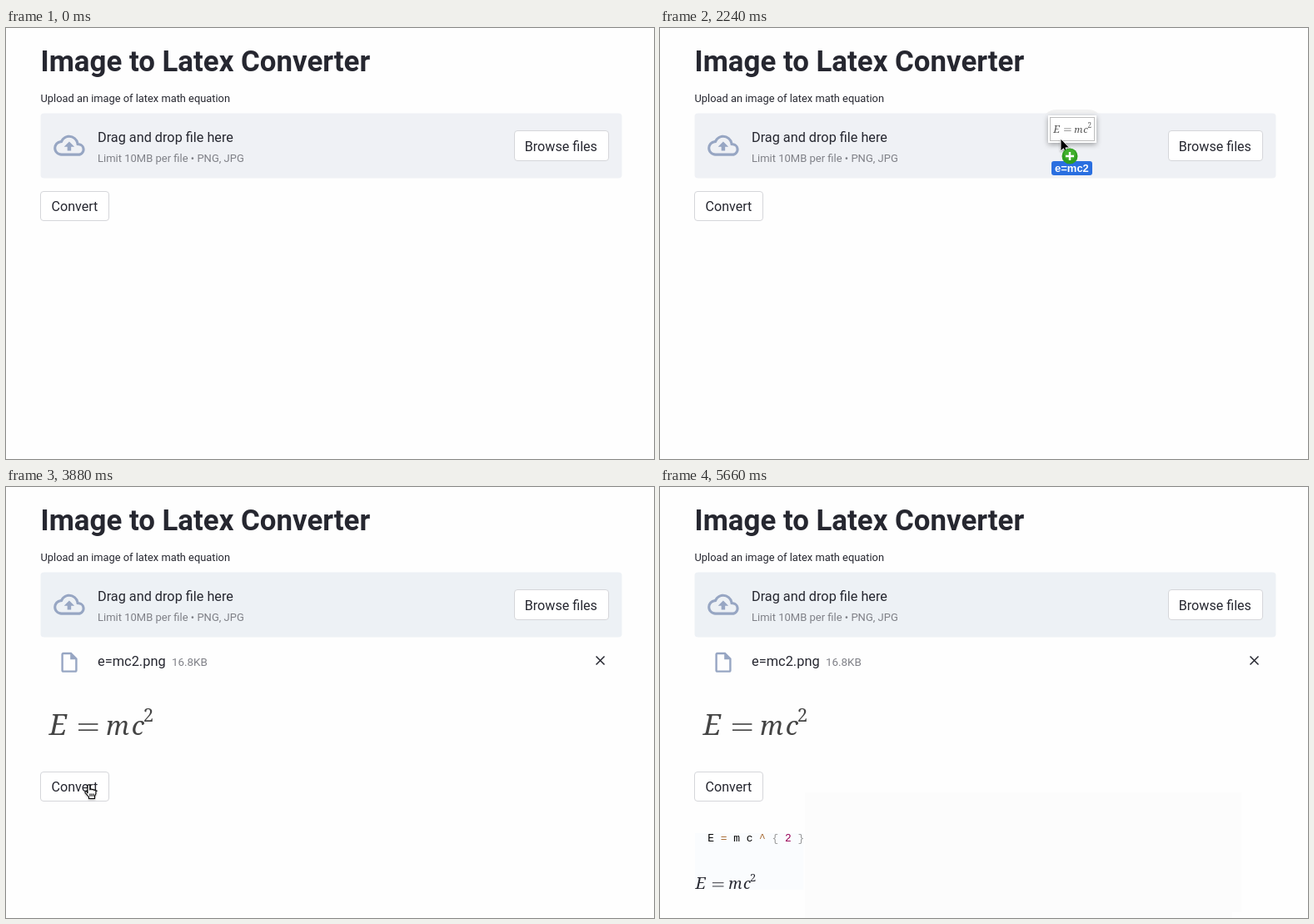
Write an HTML page that moves like this. It is 778 px wide and 518 px high and loops after 5760 ms.

```html
<!DOCTYPE html>
<html lang="en">
<head>
<meta charset="utf-8">
<title>Image to Latex Converter</title>
<style>
  html, body { margin: 0; width: 100%; height: 100%; overflow: hidden; background: #fefefe; }
  svg { display: block; }
  text { font-family: Roboto, sans-serif; fill: #262730; }
  .muted { fill: #7f8087; }
  .mono { font: 12.9px "Liberation Mono", monospace; fill: #000; }
  .math text { font-family: "Noto Serif", serif; fill: inherit; }
  .math .it { font-style: italic; }
  .tag { font: bold 13px "Liberation Sans", sans-serif; fill: #fff; }
  .icon { fill: #97a6c3; }
  .btn { fill: #fff; stroke: #d5d6da; }
  .op { fill: #a5652a; }
  .brace { fill: #999; }
  .num { fill: #905; }
  #convert.hot .btn { stroke: #f63366; }
  #convert.hot text { fill: #f63366; }
  #paper { filter: drop-shadow(0 2px 3px rgba(0, 0, 0, .35)); }
  #arrow, #hand { filter: drop-shadow(0 1px 1px rgba(0, 0, 0, .35)); }
</style>
</head>
<body>
<svg width="778" height="518" viewBox="0 0 778 518">
  <clipPath id="aboveZone"><rect width="778" height="102.5"/></clipPath>
  <rect width="778" height="518" fill="#fefefe"/>
  <text x="41.5" y="52.3" font-size="34.85" font-weight="700">Image to Latex Converter</text>
  <text x="41.5" y="88.6" font-size="12.85">Upload an image of latex math equation</text>

  <rect id="zone" x="41.5" y="102.5" width="698" height="78" rx="4"/>
  <path class="icon" transform="translate(57.2 122.5) scale(1.56)" d="M19.35 10.04A7.49 7.49 0 0 0 12 4C9.11 4 6.6 5.64 5.35 8.04A6 6 0 0 0 0 14c0 3.31 2.69 6 6 6h13c2.76 0 5-2.24 5-5 0-2.64-2.05-4.78-4.65-4.96zM19 18H6c-2.21 0-4-1.79-4-4 0-2.05 1.53-3.76 3.56-3.97l1.07-.11.5-.95A5.47 5.47 0 0 1 12 6c2.62 0 4.88 1.86 5.39 4.43l.3 1.5 1.53.11A2.98 2.98 0 0 1 22 15c0 1.65-1.35 3-3 3zM8 13h2.55v3h2.9v-3H16l-4-4z"/>
  <text x="110" y="137.3" font-size="16.25">Drag and drop file here</text>
  <text class="muted" x="110" y="161" font-size="13">Limit 10MB per file • PNG, JPG</text>
  <rect class="btn" x="610.5" y="123.5" width="113" height="36" rx="3.5"/>
  <text x="622.8" y="147.6" font-size="16.1">Browse files</text>

  <g id="file">
    <path class="icon" transform="translate(61.6 196.4) scale(1.2)" d="M14 2H6c-1.1 0-2 .9-2 2v16c0 1.1.9 2 2 2h12c1.1 0 2-.9 2-2V8l-6-6zM6 20V4h7v5h5v11H6z"/>
    <text x="110" y="214.5" font-size="16.4">e=mc2.png</text>
    <text class="muted" x="199" y="214.5" font-size="13.4">16.8KB</text>
    <path d="M708.5 203.5l10 10m0-10l-10 10" stroke="#262730" stroke-width="1.5"/>
  </g>
  <g id="preview" class="math" fill="#444"></g>

  <g id="convert">
    <rect id="ring" x="40" y="-1.5" width="85" height="38" rx="5" fill="none" stroke="#fa99b3" stroke-width="3"/>
    <rect class="btn" x="41.5" width="82" height="35" rx="3.5"/>
    <text x="54.5" y="23.6" font-size="16.1">Convert</text>
  </g>

  <g id="output">
    <rect x="42" y="416" width="130.5" height="68" fill="#fafcfe"/>
    <text class="mono" x="57.2" y="426">E <tspan class="op">=</tspan> m c <tspan class="op">^</tspan> <tspan class="brace">{</tspan> <tspan class="num">2</tspan> <tspan class="brace">}</tspan></text>
    <g id="result" class="math" fill="#262730"></g>
  </g>
  <path id="panel" d="M174 367H698V511H687V518H174Z" fill="#fcfcfc"/>

  <g clip-path="url(#aboveZone)">
    <rect id="halo" x="-8" y="-7" width="74" height="48" rx="18" fill="#000" opacity=".05"/>
  </g>
  <g id="drag">
    <g id="paper">
      <rect width="58" height="33" fill="#fff"/>
      <rect x="2.5" y="2.5" width="53" height="28" fill="#fff" stroke="#bdbdbd"/>
    </g>
    <g id="mini" class="math" fill="#555"></g>
    <rect id="tagBox" x="4" y="55" width="49" height="17" rx="3"/>
    <text class="tag" x="8" y="68">e=mc2</text>
  </g>
  <path id="arrow" d="M0 0V15L3.4 11.8L5.8 17.2L8.2 16.2L5.9 10.9H10.6Z" stroke="#fff" stroke-width=".9"/>
  <g id="badge">
    <circle r="9.5" fill="#2f9e1f"/>
    <circle cy="-2" r="7" fill="#4cbb35" opacity=".6"/>
    <path d="M-5 0H5M0-5V5" stroke="#fff" stroke-width="2.4"/>
  </g>
  <g id="hand" fill="#fff" stroke="#000" stroke-width="1.1" stroke-linejoin="round">
    <path d="M4 11V2.2a1.4 1.4 0 0 1 2.8 0V7a1.3 1.3 0 0 1 2.5 0a1.3 1.3 0 0 1 2.4.6a1.2 1.2 0 0 1 2.2.8V11.5L12.5 14.5V17.5H5.5V15.5L1 10.4a1.3 1.3 0 0 1 2-1.5Z"/>
    <path d="M6.9 11.5v3.2M9 11.5v3.2M11.1 11.5v3.2"/>
  </g>
</svg>
<script>
const LOOP = 5760;
const $ = id => document.getElementById(id);
const show = (id, on) => { $(id).style.display = on ? "" : "none"; };
const move = (id, x, y) => $(id).setAttribute("transform", `translate(${x} ${y})`);
const latest = (steps, t) => steps.filter(s => s[0] <= t).pop();

// Each step: start time, then its values.
const dragSteps = [[0], [1650, 548, 70], [1800, 495, 74], [1950, 468, 97], [2090, 467, 103], [2240, 466, 105], [2390]];
const pointerSteps = [
  [0], [1650, "arrow", 556, 97], [1800, "arrow", 507, 101], [1950, "arrow", 485, 125],
  [2090, "arrow", 483, 131], [2240, "arrow", 481, 133], [3280, "arrow", 409.5, 165],
  [3430, "arrow", 161, 358], [3580, "arrow", 110, 386], [3730, "arrow", 99, 357],
  [3880, "hand", 94, 357], [5060, "arrow", 175, 367], [5210, "arrow", 688, 511], [5360]
];
const buttonSteps = [[0, 196.5], [2390, 249.5], [2830, 342.5]];

function drawMath(id, x, y, em) {
  const glyph = (ch, dx, size, dy = 0, cls = "it") =>
    `<text class="${cls}" x="${x + dx * em}" y="${y - dy * em}" font-size="${size * em}">${ch}</text>`;
  const bar = dy =>
    `<rect x="${x + em}" y="${y - dy * em}" width="${.65 * em}" height="${.045 * em}"/>`;
  $(id).innerHTML = glyph("E", .02, .96) + bar(.37) + bar(.17) +
    glyph("m", 1.92, .87) + glyph("c", 2.77, .87) + glyph("2", 3.16, .62, .42, "");
}

function render(t) {
  const [, dx, dy] = latest(dragSteps, t);
  const [, kind, px, py] = latest(pointerSteps, t);
  const dragging = dx !== undefined;
  const over = dragging && t >= 1950;

  for (const id of ["drag", "halo"]) {
    show(id, dragging);
    if (dragging) move(id, dx, dy);
  }
  $("tagBox").setAttribute("fill", t < 1800 ? "#5b92ea" : "#2a6fe0");
  show("badge", over);
  if (over) move("badge", dx + 26, dy + 49);

  for (const id of ["arrow", "hand"]) {
    show(id, id === kind);
    if (id === kind) move(id, px, py);
  }

  $("zone").setAttribute("fill", t < 2390 ? "#eff1f5" : "#edf1f5");
  show("file", t >= 2390);
  show("preview", t >= 2830);
  show("output", t >= 4620);
  show("panel", t >= 5210);

  move("convert", 0, latest(buttonSteps, t)[1]);
  $("convert").classList.toggle("hot", t >= 4020 && t < 5660);
  show("ring", t >= 4170 && t < 5660);
}

drawMath("preview", 51, 297.5, 36);
drawMath("result", 42, 483, 20.9);
drawMath("mini", 6, 20.5, 13.1);

const start = performance.now();
function tick() {
  render((performance.now() - start) % LOOP);
  requestAnimationFrame(tick);
}
tick();
</script>
</body>
</html>
```
